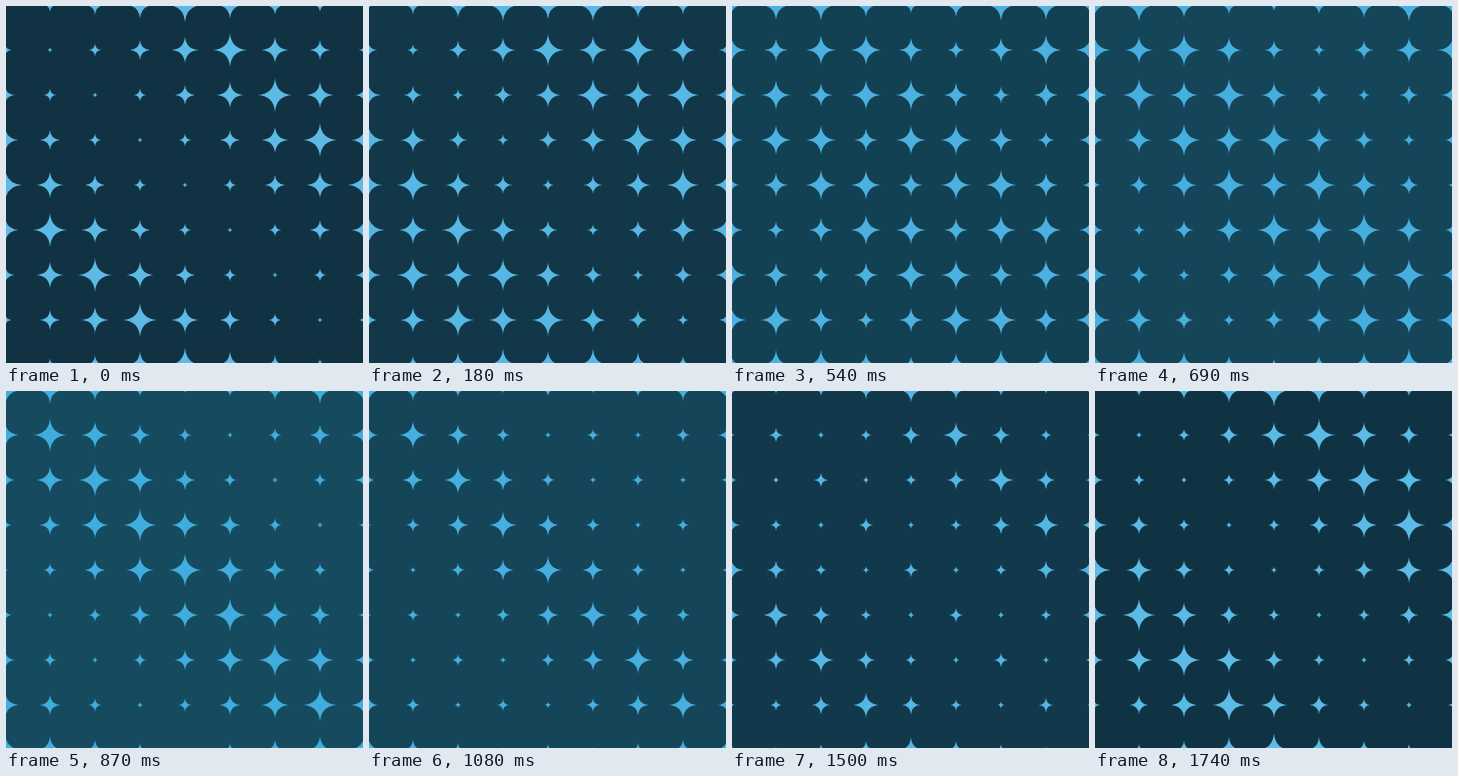
An HTML page with a canvas for the animation above (1.77 s loop, 357 by 357 pixels).

```html
<!DOCTYPE html>
<html lang="en">
<head>
<meta charset="utf-8">
<title>Twinkling star grid</title>
<style>
  html, body { margin: 0; width: 100%; height: 100%; overflow: hidden; background: #103242; }
  canvas { display: block; width: 357px; height: 357px; }
</style>
</head>
<body>
<canvas width="357" height="357"></canvas>
<script>
const ctx = document.querySelector('canvas').getContext('2d');
const LOOP = 1770, STEP = 30, GAP = 45, ORIGIN = -1;
const MIN_R = 3, MAX_R = 17, WAIST = 0.07;
const BACK = [[16, 50, 66], [21, 74, 95]];
const STAR = [[93, 186, 230], [65, 172, 222]];

// Triangle wave: 0 at whole numbers, 1 halfway between
const tri = p => 1 - Math.abs(1 - 2 * (p % 1));
const mix = ([a, b], k) => `rgb(${a.map((v, i) => Math.round(v + (b[i] - v) * k))})`;

function addStar(x, y, r) {
  const w = r * WAIST;
  ctx.moveTo(x, y - r);
  ctx.quadraticCurveTo(x + w, y - w, x + r, y);
  ctx.quadraticCurveTo(x + w, y + w, x, y + r);
  ctx.quadraticCurveTo(x - w, y + w, x - r, y);
  ctx.quadraticCurveTo(x - w, y - w, x, y - r);
}

function draw(phase) {
  const k = tri(phase);
  ctx.fillStyle = mix(BACK, k);
  ctx.fillRect(0, 0, 357, 357);
  ctx.fillStyle = mix(STAR, k);
  ctx.beginPath();
  for (let row = 0; row < 9; row++) {
    for (let col = 0; col < 9; col++) {
      // Distance from the nearest main diagonal, repeating every 8 cells
      const d = Math.abs(col - row);
      const delay = Math.min(d, 8 - d) / 8;
      const r = MIN_R + (MAX_R - MIN_R) * tri(phase + delay);
      addStar(ORIGIN + col * GAP, ORIGIN + row * GAP, r);
    }
  }
  ctx.fill();
}

const start = performance.now();
function tick() {
  const t = (performance.now() - start) % LOOP;
  draw(Math.floor(t / STEP) * STEP / LOOP);
  requestAnimationFrame(tick);
}
tick();
</script>
</body>
</html>
```
